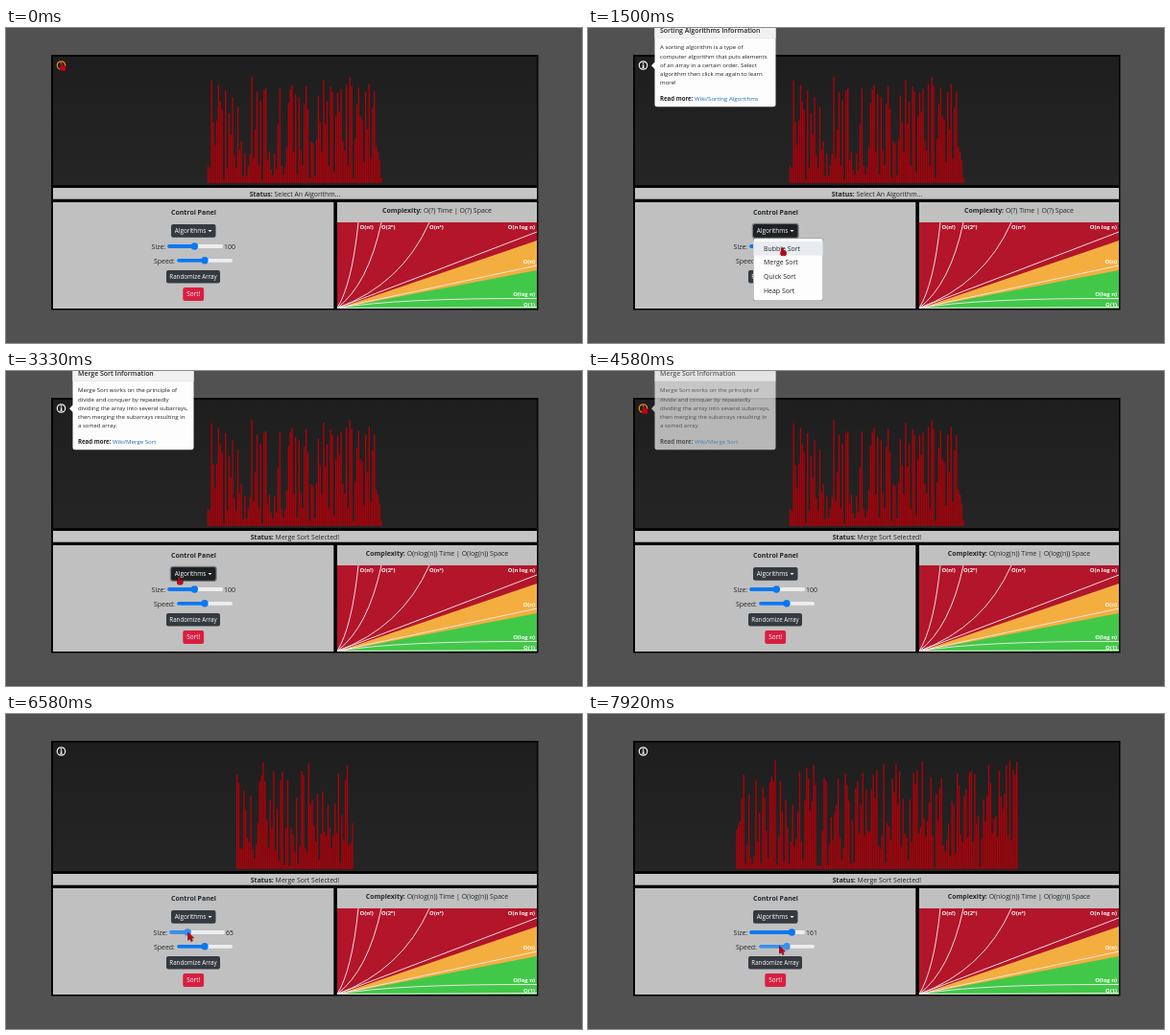
An HTML page with a canvas that plays this animation: 600 by 329 pixels, repeating every 8000 ms.

```html
<!DOCTYPE html>
<html lang="en">
<head>
<meta charset="utf-8">
<title>Sorting Visualizer</title>
<style>
html, body { margin: 0; width: 100%; height: 100%; overflow: hidden; background: #525152; }
canvas { display: block; width: 600px; height: 329px; }
</style>
</head>
<body>
<canvas id="stage" width="600" height="329"></canvas>
<script>
const g = document.getElementById('stage').getContext('2d');
const LOOP = 8000, STEPS = 96;
const FONT = '"Open Sans", "Noto Sans", sans-serif';
const BODY = 6.95, SMALL = 6.08, LINE = 9.3, ITEM = 14.6;

const algos = [
  { status: 'Select An Algorithm...', cost: 'O(?) Time | O(?) Space',
    title: 'Sorting Algorithms Information', link: 'Wiki/Sorting Algorithms',
    lines: ['A sorting algorithm is a type of', 'computer algorithm that puts elements',
      'of an array in a certain order. Select', 'algorithm then click me again to learn', 'more!'] },
  { status: 'Bubble Sort Selected!', cost: 'O(n^2) Time | O(1) Space',
    title: 'Bubble Sort Information', link: 'Wiki/Bubble Sort',
    lines: ['Bubble Sort works by stepping through', 'the array and repeatedly swapping the',
      'adjacent elements if they are in the', 'wrong order.'] },
  { status: 'Merge Sort Selected!', cost: 'O(nlog(n)) Time | O(log(n)) Space',
    title: 'Merge Sort Information', link: 'Wiki/Merge Sort',
    lines: ['Merge Sort works on the principle of', 'divide and conquer by repeatedly',
      'dividing the array into several subarrays,', 'then merging the subarrays resulting in',
      'a sorted array.'] }
];
const menu = ['Bubble Sort', 'Merge Sort', 'Quick Sort', 'Heap Sort'];

const spots = {
  icon: [56, 36], plot: [174, 117], button: [211, 210],
  bubble: [200, 229], merge: [198, 244], size: [196.5, 228], speed: [199, 242]
};
// start step, end step, destination
const moves = [
  [4, 6, 'plot'], [6, 9, 'button'], [13, 16, 'bubble'], [20, 24, 'button'],
  [29, 34, 'merge'], [39, 46, 'icon'], [58, 66, 'size'], [88, 91, 'speed']
];
// when each thing happens, in steps
const OPEN_1 = 12, PICK_1 = 20, OPEN_2 = 29, PICK_2 = 39, DRAG = 69, DROP = 88;
const sizes = [[DRAG, 100], [75, 100], [79, 65], [86, 149], [DROP, 161]];

const clamp = v => Math.max(0, Math.min(1, v));
const mix = (a, b, u) => a + (b - a) * u;

function sizeAt(s) {
  let n = sizes[0][1];
  for (let i = 1; i < sizes.length; i++) {
    const [from, a] = sizes[i - 1], [to, b] = sizes[i];
    if (s > from) n = mix(a, b, clamp((s - from) / (to - from)));
  }
  return Math.round(n);
}

const digitShift = n => (3 - String(n).length) * 2;
const thumbAt = n => 171.5 + digitShift(n) + (n - 5) / 195 * 51;

function pointerAt(s, n) {
  if (s >= DRAG && s <= DROP) return [thumbAt(n), 228];
  let [x, y] = spots.icon;
  for (const [from, to, name] of moves) {
    if (s <= from) break;
    if (from === DROP) x = thumbAt(n);
    const u = clamp((s - from) / (to - from));
    x = mix(x, spots[name][0], u);
    y = mix(y, spots[name][1], u);
  }
  return [x, y];
}

function random(seed) {
  return () => {
    seed = (seed * 1664525 + 1013904223) >>> 0;
    return seed / 4294967296;
  };
}

function rect(x, y, w, h, color) {
  g.fillStyle = color;
  g.fillRect(x, y, w, h);
}

function round(x, y, w, h, r, color) {
  g.fillStyle = color;
  g.beginPath();
  g.roundRect(x, y, w, h, r);
  g.fill();
}

function disc(x, y, r, color) {
  g.fillStyle = color;
  g.beginPath();
  g.arc(x, y, r, 0, 7);
  g.fill();
}

function shape(points, color) {
  g.fillStyle = color;
  g.beginPath();
  points.forEach(p => g.lineTo(...p));
  g.closePath();
  g.fill();
}

function text(str, x, y, { size = BODY, weight = 400, color = '#212529', align = 'left' } = {}) {
  g.font = `${weight} ${size}px ${FONT}`;
  g.fillStyle = color;
  g.textAlign = align;
  g.fillText(str, x, y);
  return g.measureText(str).width;
}

function labelled(name, value, cx, y) {
  g.font = `700 ${BODY}px ${FONT}`;
  const a = g.measureText(name + ' ').width;
  g.font = `400 ${BODY}px ${FONT}`;
  const x = cx - (a + g.measureText(value).width) / 2;
  text(name, x, y, { weight: 700 });
  text(value, x + a, y);
}

function slider(x, y, thumb, active) {
  const blue = active ? '#3a8fec' : '#0a78f0';
  round(x, y - 1.9, 58, 3.8, 1.9, '#eeeeee');
  round(x, y - 1.9, thumb - x, 3.8, 1.9, blue);
  disc(thumb, y, 3.7, blue);
}

function drawBars(n) {
  const pitch = 1.824, left = 301 - n * pitch / 2;
  const next = random(n * 7919 + 17);
  for (let i = 0; i < n; i++) {
    const h = 1 + 113 * next();
    rect(left + i * pitch, 162 - h, 1.37, h, '#b0000a');
  }
}

function drawGraph() {
  const x = 345, y = 203, w = 208, h = 90, right = x + w, base = y + h;
  rect(x, y, w, h, '#b3152b');
  shape([[x, base], [right, 222], [right, base]], '#f4ae40');
  shape([[x, base], [right, 253], [right, base]], '#41c849');

  const curve = (cx, cy, ex, ey) => {
    g.beginPath();
    g.moveTo(x, base - 0.5);
    g.quadraticCurveTo(cx, cy, ex, ey);
    g.stroke();
  };
  g.strokeStyle = '#f3e6e6';
  g.lineWidth = 0.95;
  for (const d of [22, 46, 96]) curve(x + d * 0.7, base - h * 0.28, x + d, y);
  for (const end of [213, 248, 291.5]) curve(x + w / 2, (base + end) / 2, right, end);
  curve(x + w * 0.3, 282, right, 282.5);

  const white = { size: 5.9, weight: 700, color: '#fff' };
  text('O(n!)', 368.5, 210, white);
  text('O(2ⁿ)', 391, 210, white);
  text('O(n²)', 441, 210, white);
  const end = { ...white, align: 'right' };
  text('O(n log n)', 551, 210, end);
  text('O(n)', 551, 246, end);
  text('O(log n)', 551, 280, end);
  text('O(1)', 551, 290.5, end);
}

function drawControls(n, s) {
  const focus = s >= OPEN_1 && s < 50;
  text('Control Panel', 195.5, 194.5, { weight: 700, align: 'center' });
  if (focus) round(170.8, 203.8, 48.9, 16.2, 3, '#777b7f');
  round(172, 205, 46.5, 13.8, 2, focus ? '#1d2124' : '#343a40');
  const white = { size: 6.4, color: '#fff' };
  text('Algorithms', 175.8, 214.4, white);
  shape([[210.5, 210.9], [214.5, 210.9], [212.5, 213]], '#fff');

  const shift = digitShift(n);
  text('Size:', 151.6 + shift, 231.4);
  slider(168 + shift, 228, thumbAt(n), s >= DRAG && s <= DROP);
  text(n, 227 + shift, 231.4);
  text('Speed:', 154, 246.3);
  slider(178, 242.8, 207, s >= 92);

  round(167, 253, 56, 13.6, 2, '#343a40');
  text('Randomize Array', 195, 262.2, { ...white, size: 6.2, align: 'center' });
  round(184.3, 271, 21.8, 14, 2, '#d91f40');
  text('Sort!', 195.2, 280.4, { ...white, align: 'center' });
}

function drawMenu(y) {
  round(172, 219.4, 73, 65.5, 2, '#8b8b8b');
  round(172.5, 219.9, 72, 64.5, 2, '#fdfdfd');
  menu.forEach((name, i) => {
    const top = 223 + i * ITEM;
    if (y >= top && y < top + ITEM) rect(172.5, top, 72, ITEM, '#e9ecef');
    text(name, 183, top + 9.8);
  });
}

function drawIcon(hover) {
  const color = hover ? '#f08a24' : '#f4f4f4';
  g.strokeStyle = color;
  g.lineWidth = 1.2;
  g.beginPath();
  g.arc(57.5, 39, 4.2, 0, 7);
  g.stroke();
  disc(57.5, 36.9, 0.8, color);
  rect(56.8, 38.3, 1.5, 3.2, color);
  rect(56.2, 41, 2.7, 0.7, color);
}

function drawPopover(info, alpha) {
  if (alpha <= 0) return;
  const first = 22.2, read = first + (info.lines.length - 1) * LINE + 16.3;
  const bottom = read + 6.5;
  g.globalAlpha = alpha;
  g.fillStyle = '#fdfdfd';
  g.beginPath();
  g.roundRect(69.5, -12, 126, bottom + 12, 2.5);
  g.moveTo(69.5, 35.5);
  g.lineTo(66, 39.3);
  g.lineTo(69.5, 43);
  g.fill();
  rect(69.5, 0, 126, 10.5, '#f1f1f1');
  rect(69.5, 10.5, 126, 0.5, '#dddddd');
  text(info.title, 75, 5.4, { weight: 600 });
  info.lines.forEach((line, i) => text(line, 75, first + i * LINE, { size: SMALL }));
  const w = text('Read more: ', 75, read, { size: SMALL, weight: 700 });
  text(info.link, 75 + w, read, { size: SMALL, color: '#1769b5' });
  g.globalAlpha = 1;
}

function drawPointer(x, y, hand) {
  g.save();
  g.translate(x + 0.5, y + 0.3);
  g.scale(0.92, 0.92);
  g.strokeStyle = '#3a0508';
  g.lineWidth = 0.8;
  g.fillStyle = '#c00414';
  g.beginPath();
  if (hand) {
    g.roundRect(1.2, 0.5, 1.9, 5, 0.9);
    g.roundRect(0.2, 3.6, 6.2, 5.6, 2);
  } else {
    [[0, 0], [0, 8.6], [2, 6.9], [3.5, 10], [5, 9.3], [3.6, 6.3], [6.3, 6]]
      .forEach(p => g.lineTo(...p));
    g.closePath();
  }
  g.stroke();
  g.fill();
  g.restore();
}

function draw(t) {
  const s = Math.floor(t * STEPS / LOOP + 0.1) % STEPS;
  const info = algos[(s >= PICK_1) + (s >= PICK_2)];
  const n = sizeAt(s);
  const [x, y] = pointerAt(s, n);
  const open = (s >= OPEN_1 && s < PICK_1) || (s >= OPEN_2 && s < PICK_2);
  const onIcon = Math.hypot(x - 57.5, y - 39) < 7;
  const onButton = x > 172 && x < 218 && y > 204 && y < 219;

  rect(0, 0, 600, 329, '#525152');
  rect(47, 28, 507.5, 266.5, '#050505');
  const dark = g.createLinearGradient(0, 30, 0, 164);
  dark.addColorStop(0, '#1e1e1e');
  dark.addColorStop(1, '#252525');
  rect(49, 30, 504, 134, dark);
  rect(49, 167, 504, 11.7, '#c4c4c4');
  rect(49, 182, 292.3, 111, '#c0c0c0');
  rect(345, 182, 208, 111, '#c0c0c0');

  // the bars trail the slider slightly
  drawBars(sizeAt(s - 0.25));
  labelled('Status:', info.status, 301, 175.6);
  labelled('Complexity:', info.cost, 449, 192.6);
  drawGraph();
  drawControls(n, s);
  if (open) drawMenu(y);
  drawIcon(onIcon);
  drawPopover(info, s < OPEN_2 ? clamp((s - 3) / 2.5) : 1 - clamp((s - 54) / 3.2));
  drawPointer(x, y, onIcon || onButton || open);
}

function tick(now) {
  draw(now % LOOP);
  requestAnimationFrame(tick);
}
draw(0);
requestAnimationFrame(tick);
</script>
</body>
</html>
```
